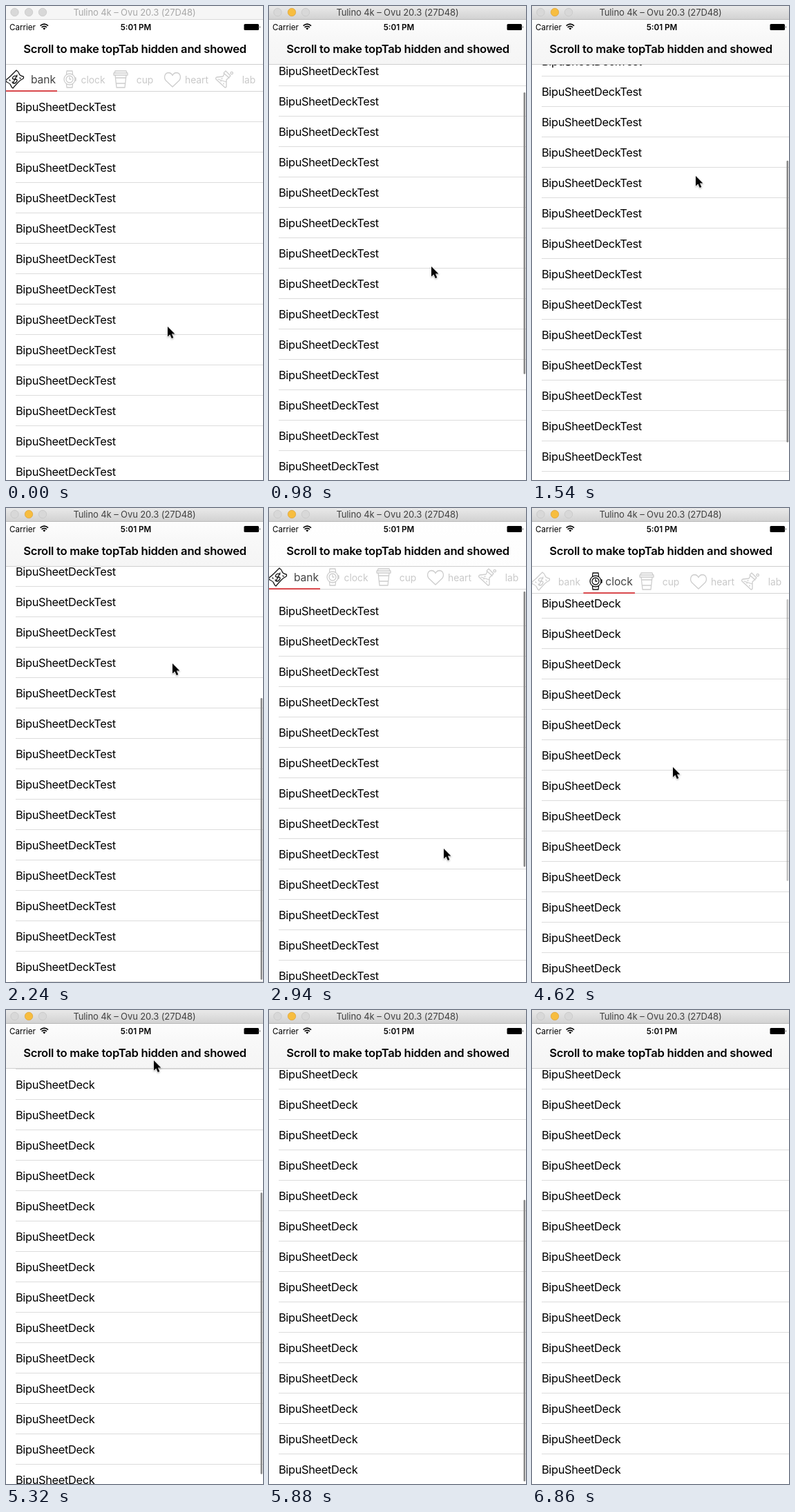
Recreate the animation shown at these times as an HTML page. Size 372 px wide and 686 px high, loop 7 s.

```html
<!DOCTYPE html>
<html lang="en">
<head>
<meta charset="utf-8">
<title>Scrolling tabs</title>
<style>
html, body { margin: 0; width: 100%; height: 100%; overflow: hidden; background: #fff; }
svg { display: block; width: 372px; height: 686px; font-family: Inter, Roboto, sans-serif; }
.row { font-size: 16.4px; letter-spacing: -.35px; }
.icon { fill: none; stroke-width: 1.3; stroke-linejoin: round; stroke-linecap: round; }
</style>
</head>
<body>
<svg viewBox="0 0 372 686">
  <defs>
    <linearGradient id="chrome" x2="0" y2="1">
      <stop stop-color="#e9e9e9"/><stop offset="1" stop-color="#d1d1d1"/>
    </linearGradient>
    <linearGradient id="shade" x2="0" y2="1">
      <stop stop-color="#fdfdfd"/><stop offset=".4" stop-color="#f8f8f8"/><stop offset="1" stop-color="#f5f5f5"/>
    </linearGradient>
  </defs>
  <rect width="372" height="686" fill="#fff"/>
  <g id="pages"></g>
  <rect id="bar" x="368.5" width="2.6" rx="1.3" fill="#888"/>
  <g id="tabs">
    <rect y="84" width="372" height="40" fill="#fff"/>
    <path d="M0 123.5H372" stroke="#d4d4d4"/>
    <rect id="mark" y="122" width="74.5" height="2" fill="#d9484c"/>
  </g>
  <g id="nav">
    <rect y="20" width="372" height="64" fill="#fff"/>
    <rect id="tint" y="20" width="372" height="64" fill="url(#shade)"/>
    <path d="M0 84.5H372" stroke="#cfcfcf"/>
    <text x="5" y="34.5" font-size="11.6" textLength="">Carrier</text>
    <g fill="none" stroke="#000" stroke-width="1.7">
      <path d="M49.6 28.6q5.7-4.8 11.4 0M51.6 30.9q3.7-3.1 7.4 0"/>
      <path d="M53.3 32.4q2-1.6 4 0l-2 2.2z" fill="#000" stroke="none"/>
    </g>
    <text x="188" y="34.5" font-size="11.6" font-weight="600" text-anchor="middle">5:01 PM</text>
    <rect x="344.5" y="26" width="21.5" height="9" rx="1.5"/>
    <path d="M367 28.8q1.6 1.7 0 3.4z"/>
    <text x="186.5" y="68" font-size="16.6" font-weight="600" letter-spacing="-.25" text-anchor="middle">Scroll to make topTab hidden and showed</text>
  </g>
  <g id="chromeBar">
    <rect id="frame" width="372" height="20"/>
    <path id="edge" d="M0 19.5H372"/>
    <g stroke-width=".7">
      <circle cx="12.5" cy="9" r="5.7" fill="#d8d8d8" stroke="#c3c3c3"/>
      <circle id="dot" cx="33" cy="9" r="5.7"/>
      <circle cx="53" cy="9" r="5.7" fill="#d8d8d8" stroke="#c3c3c3"/>
    </g>
    <text id="caption" x="186" y="14" font-size="13" letter-spacing="-.1" text-anchor="middle">Tulino 4k – Ovu 20.3 (27D48)</text>
  </g>
  <path id="cursor" d="M0 0V14.6L3.4 11.4 5.8 17 8.3 15.9 5.9 10.5H10.4Z" stroke="#fff" stroke-width="1.1" paint-order="stroke" style="filter:drop-shadow(0 1px 1px rgba(0,0,0,.3))"/>
</svg>
<script>
const LOOP = 7000, STEP = 140, ROWS = 20, ROW_H = 44, PAGE_W = 374.5;
const VIEW_H = 602, MAX = ROWS * ROW_H - VIEW_H, TRACK = VIEW_H - 6;
const THUMB = TRACK * VIEW_H / (ROWS * ROW_H);
const $ = id => document.getElementById(id);

function add(parent, tag, attrs, text) {
  const el = document.createElementNS('http://www.w3.org/2000/svg', tag);
  set(el, attrs);
  if (text) el.textContent = text;
  return parent.appendChild(el);
}
function set(el, attrs) {
  for (const k in attrs) el.setAttribute(k, attrs[k]);
}

// Monotone cubic curve through [time, value] pairs.
function curve(...pts) {
  const slope = pts.slice(1).map((p, i) => (p[1] - pts[i][1]) / (p[0] - pts[i][0]));
  const tangent = pts.map((_, i) => {
    const a = slope[i - 1], b = slope[i];
    return a * b > 0 ? 2 * a * b / (a + b) : 0;
  });
  return t => {
    const i = pts.findIndex(p => p[0] > t);
    if (i < 0) return pts[pts.length - 1][1];
    if (i === 0) return pts[0][1];
    const [t0, v0] = pts[i - 1], [t1, v1] = pts[i], d = t1 - t0, u = (t - t0) / d;
    return v0 + (v1 - v0) * u * u * (3 - 2 * u)
      + d * u * (1 - u) * ((1 - u) * tangent[i - 1] - u * tangent[i]);
  };
}

const motion = {
  x: curve([0, 234], [980, 235], [1540, 237], [2240, 241], [2940, 253], [3640, 265], [3920, 170], [4200, 92], [4620, 204], [5320, 214], [5740, 218]),
  y: curve([0, 464], [280, 464], [980, 377], [1540, 246], [1960, 215], [2240, 225], [2940, 493], [3640, 302], [3920, 299], [4200, 306], [4620, 375], [5320, 73], [5600, 68], [5740, 36]),
  first: curve([280, 0], [980, 56.5], [1540, 202.5], [1960, MAX], [2240, MAX], [2800, 18], [2940, -9], [3360, 0]),
  second: curve([4480, 0], [4620, 8], [5320, 262], [5460, 284], [5880, MAX - .5]),
  shown: curve([280, 1], [700, 0], [2520, 0], [2940, .85], [3220, 1], [4620, 1], [5040, 0]),
  swipe: curve([3640, 0], [3920, 95], [4060, 190], [4480, PAGE_W]),
  bar: curve([140, 0], [420, 1], [3220, 1], [3500, 0], [4480, 0], [4760, 1], [5880, 1], [6160, 0])
};

const pages = ['BipuSheetDeckTest', 'BipuSheetDeck'].map(name => {
  const g = add($('pages'), 'g', {});
  for (let i = 0; i < ROWS; i++) {
    add(g, 'text', { class: 'row', x: 14, y: i * ROW_H + 28 }, name);
    add(g, 'path', { d: `M14 ${(i + 1) * ROW_H}H373`, stroke: '#dcdcdc' });
  }
  return g;
});

// Label, label centre, icon centre, icon path.
const tabs = [
  ['bank', 54, 13, 'M-13 1Q-9-2-6-5T2-13Q5-11 6-8T12-4Q13-3 12-1Q8 1 5 4T-3 13Q-5 12-6 9T-12 4Q-14 2-13 1ZM3-4Q-1-6-3-3T0 0T2 4T-4 4M3-6L-3 6M-8 1l1 1M7-2l1 1'],
  ['clock', 126, 92, 'M-4.5-7L-4-12H4L4.5-7M-4.5 7L-4 12H4L4.5 7M-8 0a8 8 0 1 0 16 0a8 8 0 1 0-16 0M-5 0a5 5 0 1 0 10 0a5 5 0 1 0-10 0M0-3V0H2M8-2h1v4h-1'],
  ['cup', 201, 166, 'M-8-12H8L9-9H-9ZM-10-9H10V-6H-10ZM-8-6L-6 12H6L8-6M-7.5-2H7.5M-6.6 6H6.6'],
  ['heart', 276, 241, 'M0 11L-9.500 2C-13-2-11.500-9-6-9.500Q-2-9.500 0-5.500Q2-9.500 6-9.500C11.500-9 13-2 9.500 2Z'],
  ['lab', 351.5, 315, 'M0-9L8-2M1-8L-1-4L-10-3Q-12-2-11 0L2 12Q4 12 4 10L4 1L7-2M1-10L3-12L10-5L8-3M-8 0L4 4M-4 2v1M0 6v1M-3-1h1M10-9a1.700 1.700 0 1 0 3.400 0a1.700 1.700 0 1 0-3.400 0']
].map(([name, x, ix, d]) => ({
  icon: add($('tabs'), 'path', { class: 'icon', d, transform: `translate(${ix} 106)` }),
  label: add($('tabs'), 'text', { x, y: 111.5, 'text-anchor': 'middle' }, name)
}));

function draw(time) {
  const t = Math.floor(time % LOOP / STEP) * STEP;
  const m = {};
  for (const k in motion) m[k] = motion[k](t);

  const top = 83.7 + 40 * m.shown;
  const lift = 40 * (m.shown - 1);
  const offsets = [m.first, m.second];
  pages.forEach((g, i) => {
    const y = Math.round(top - offsets[i] - .5) + .5;
    set(g, { transform: `translate(${i * PAGE_W - m.swipe} ${y})` });
  });

  const active = m.swipe > PAGE_W / 2 ? 1 : 0;
  const off = offsets[active];
  const over = Math.max(0, -off, off - MAX);
  const travel = (TRACK - THUMB) / MAX;
  const shift = Math.max(0, Math.min(off, MAX)) * travel + Math.max(0, off - MAX);
  set($('bar'), { y: top + 3 + shift, height: THUMB - over, opacity: m.bar });

  set($('tabs'), { transform: `translate(0 ${lift})` });
  set($('mark'), { x: m.swipe / 5 - .5 });
  tabs.forEach(({ icon, label }, i) => {
    const on = i === active;
    set(icon, { stroke: on ? '#111' : '#cdcdcd' });
    set(label, { fill: on ? '#444' : '#c9c9c9', 'font-size': on ? 15.6 : 13.8 });
  });
  set($('tint'), { opacity: 1 - m.shown });

  const focused = t >= 280;
  set($('frame'), { fill: focused ? 'url(#chrome)' : '#f6f6f6' });
  set($('edge'), { stroke: focused ? '#b9b9b9' : '#dadada' });
  set($('dot'), focused ? { fill: '#f7bd3f', stroke: '#dca034' } : { fill: '#d8d8d8', stroke: '#c3c3c3' });
  set($('caption'), { fill: focused ? '#404040' : '#a8a8a8' });

  set($('cursor'), {
    transform: `translate(${m.x} ${m.y})`,
    visibility: t < 5880 ? 'visible' : 'hidden'
  });
}

const start = performance.now();
function tick() {
  draw(performance.now() - start);
  requestAnimationFrame(tick);
}
draw(0);
tick();
</script>
</body>
</html>
```
